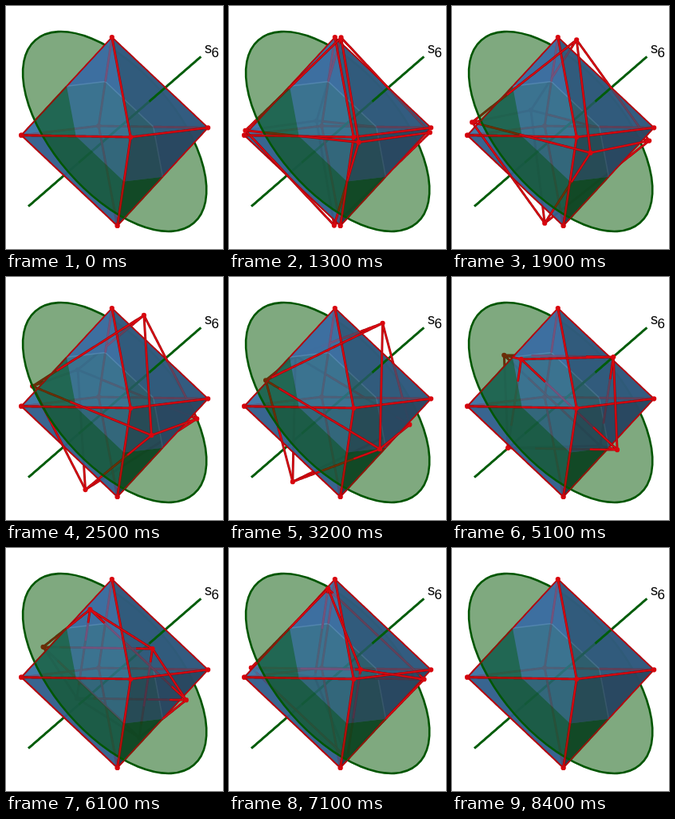
These frames come from a looping animation (272 px wide and 304 px high, 8.5 s). An HTML page with a canvas:

```html
<!DOCTYPE html>
<html>
<head>
<meta charset="utf-8">
<style>
html, body { margin: 0; width: 100%; height: 100%; overflow: hidden; background: #fff; }
canvas { display: block; }
</style>
</head>
<body>
<canvas id="stage" width="272" height="304"></canvas>
<script>
const ctx = document.getElementById('stage').getContext('2d');
const LOOP = 8500, STEP = 100;

// Points are [a, b, e] along three octahedron half-diagonals; e points to the viewer.
const CENTER = [136.2, 157];
const BASIS = [[-3.4, -118], [117, -4.7], [20, 7]];
const project = p => [0, 1].map(i =>
  CENTER[i] + p[0] * BASIS[0][i] + p[1] * BASIS[1][i] + p[2] * BASIS[2][i]);
const mix = (p, q, t) => p.map((v, i) => v + (q[i] - v) * t);
const mid = (p, q) => mix(p, q, 0.5);

const A = [1, 0, 0], B = [0, 1, 0], E = [0, 0, 1];
const D = [-1, 0, 0], C = [0, -1, 0], F = [0, 0, -1];
const VERTICES = [A, B, E, D, C, F];
const EDGES = [];
for (let i = 0; i < 6; i++)
  for (let j = i + 1; j < 6; j++) if (j - i !== 3) EDGES.push([i, j]);

const mAC = mid(A, C), mCE = mid(C, E), mDE = mid(D, E);
const mDB = mid(D, B), mBF = mid(B, F), mAF = mid(A, F);

// Rotation by up to 60 degrees, followed by reflection along the same axis.
const K = [1, 1, -1].map(v => v / Math.sqrt(3));
const clamp = x => Math.max(0, Math.min(1, x));
function transform(p, angle, reflect) {
  const c = Math.cos(angle), s = Math.sin(angle);
  const dot = p[0] * K[0] + p[1] * K[1] + p[2] * K[2];
  return p.map((v, i) => {
    const j = (i + 1) % 3, k = (i + 2) % 3;
    const cross = K[j] * p[k] - K[k] * p[j];
    return v * c - cross * s + K[i] * dot * (1 - c - 2 * reflect);
  });
}

// Layers: 0-2 below the disk plane, 3-5 above; within each: behind, inside, in front of the solid.
function layerOf([a, b, e]) {
  const rim = Math.abs(a) + Math.abs(b);
  const depth = rim + e > 0.985 ? 2 : rim + Math.abs(e) < 1.002 ? 1 : 0;
  return (a + b + e < -0.001 ? 0 : 3) + depth;
}

const newLayers = () => Array.from({ length: 6 }, () =>
  ({ thick: new Path2D(), thin: new Path2D(), dots: new Path2D() }));

function addLine(layers, p, q, weight = 'thick', pieces = 60) {
  let last = -1;
  for (let i = 0; i < pieces; i++) {
    const layer = layerOf(mix(p, q, (i + 0.5) / pieces));
    const path = layers[layer][weight];
    if (layer !== last) path.moveTo(...project(mix(p, q, i / pieces)));
    path.lineTo(...project(mix(p, q, (i + 1) / pieces)));
    last = layer;
  }
}

// Outline edges of the solid are half hidden by its faces, so they look thinner.
const isOutline = (p, q) => p[2] === 0 && q[2] === 0;

function wireframe(points) {
  const layers = newLayers();
  for (const [i, j] of EDGES) {
    const p = points[i], q = points[j];
    addLine(layers, p, q, isOutline(p, q) ? 'thin' : 'thick');
  }
  for (const p of points) {
    const [x, y] = project(p), dots = layers[layerOf(p)].dots;
    dots.moveTo(x + 3.1, y);
    dots.arc(x, y, 3.1, 0, 7);
  }
  return layers;
}

function stroke(path, color, width) {
  ctx.strokeStyle = color;
  ctx.lineWidth = width;
  ctx.stroke(path);
}

function drawWire({ thick, thin, dots }) {
  stroke(thin, '#b4060e', 1.9);
  stroke(thick, '#9c0408', 2.9);
  stroke(thick, '#dc0a12', 1.6);
  ctx.fillStyle = '#d8060e';
  ctx.fill(dots);
}

function polygon(color, ...points) {
  ctx.beginPath();
  for (const p of points) ctx.lineTo(...project(p));
  ctx.fillStyle = color;
  ctx.fill();
}

const axis = newLayers();
addLine(axis, [-0.81, -0.81, -0.81], [0.81, 0.81, 0.81], 'thick', 120);
const solid = wireframe(VERTICES);

const disk = new Path2D();
disk.ellipse(...CENTER, 151.5, 77, 49 * Math.PI / 180, 0, 2 * Math.PI);

const hexBack = new Path2D();
for (const p of [mAC, mAF, mBF, mDB]) hexBack.lineTo(...project(p));

function drawLabel() {
  ctx.fillStyle = '#000';
  ctx.font = '18px "Liberation Sans", Arial, sans-serif';
  ctx.fillText('s', 249, 59);
  ctx.font = '17px "Liberation Sans", Arial, sans-serif';
  ctx.fillText('6', 257.5, 64);
}

function draw(t) {
  const angle = Math.PI / 3 * Math.pow(clamp((t - 960) / 3240), 1.06);
  const reflect = clamp((t - 4230) / 3330);
  const still = angle === 0 || reflect === 1;
  const ghost = still ? newLayers() : wireframe(VERTICES.map(p => transform(p, angle, reflect)));
  const layer = i => {
    stroke(axis[i].thick, '#005c0a', 3);
    drawWire(solid[i]);
    drawWire(ghost[i]);
  };

  ctx.fillStyle = '#fff';
  ctx.fillRect(0, 0, 272, 304);
  ctx.lineJoin = 'round';

  layer(0);
  polygon('rgba(55,95,140,.82)', A, C, D, B);
  layer(1);
  polygon('rgba(62,122,170,.8)', C, mAC, mCE);
  polygon('rgba(48,96,140,.8)', C, mCE, mDE, D);
  polygon('rgba(26,54,62,.85)', D, mDE, mDB);
  layer(2);

  ctx.fillStyle = 'rgba(0,85,0,.5)';
  ctx.fill(disk);
  stroke(disk, '#005600', 2.6);
  ctx.globalAlpha = 0.6;
  drawWire(solid[2]);
  ctx.globalAlpha = 1;

  layer(3);
  polygon('rgba(55,92,132,.85)', mAC, A, B, mDB, mBF, mAF);
  stroke(hexBack, 'rgba(150,190,200,.6)', 1.5);
  layer(4);
  polygon('rgba(66,122,180,.65)', A, mAC, mCE, E);
  polygon('rgba(48,90,125,.68)', A, B, E);
  polygon('rgba(54,104,148,.65)', E, mCE, mDE);
  polygon('rgba(38,66,88,.75)', E, mDE, mDB, B);
  layer(5);
  drawLabel();
}

function tick() {
  const t = performance.now() % LOOP;
  draw(Math.floor(t / STEP) * STEP);
  requestAnimationFrame(tick);
}
tick();
</script>
</body>
</html>
```
